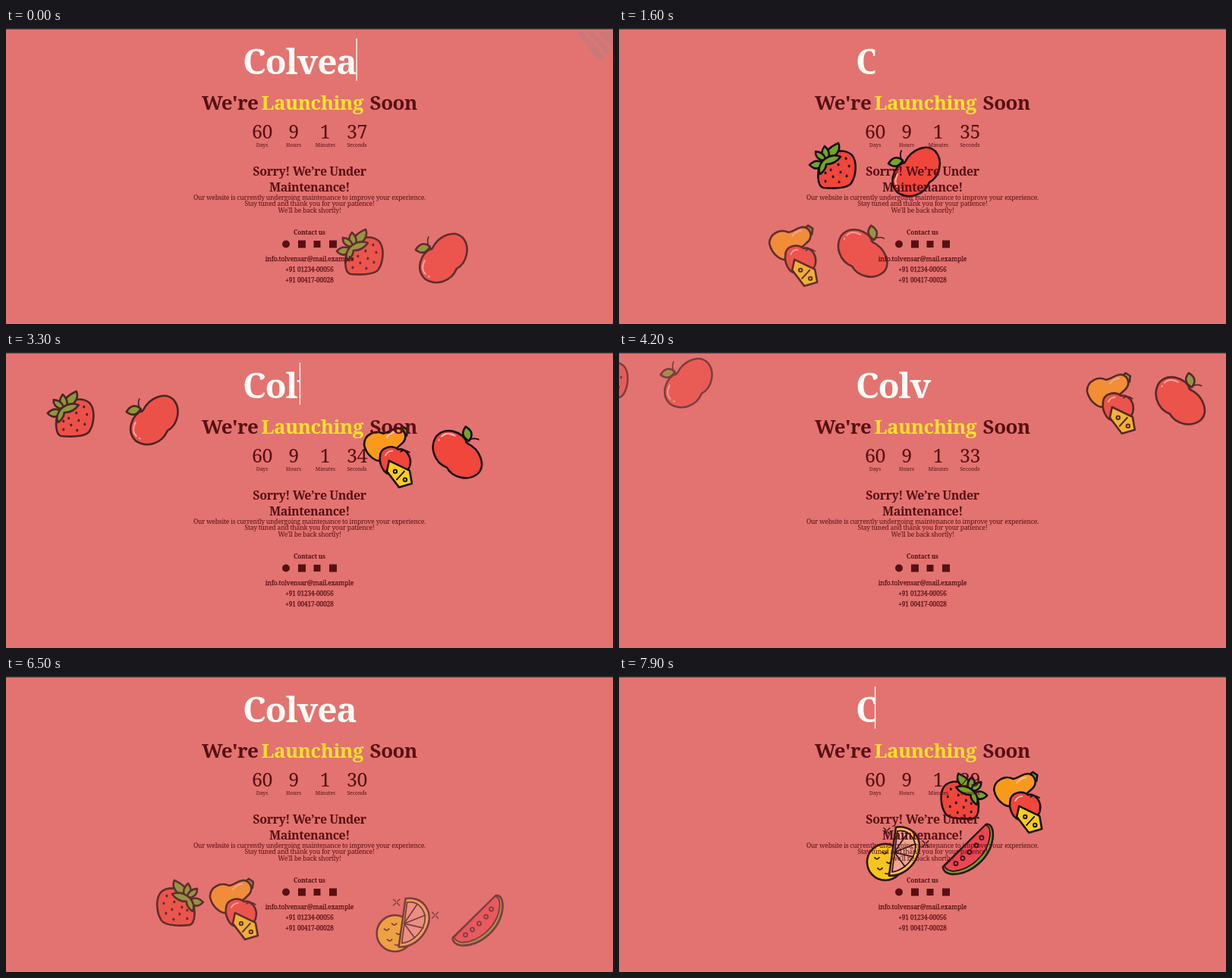
An HTML page that plays this animation: 800 px wide and 391 px high, repeating every 8000 ms.

```html
<!DOCTYPE html>
<html lang="en">
<head>
<meta charset="utf-8">
<title>Launching soon</title>
<style>
html, body { margin: 0; width: 100%; height: 100%; overflow: hidden; background: #e37370; }
svg { display: block; width: 800px; height: 391px; }
text { font-family: "Noto Serif", serif; fill: #571015; }
.mid { text-anchor: middle; }
.brand { font-size: 46px; font-weight: 700; letter-spacing: -1.2px; fill: #fffdf8; }
.title text { font-size: 26px; font-weight: 700; letter-spacing: -.55px; }
.title .hot { fill: #ffe02e; }
.digits text { font-size: 25px; letter-spacing: -.5px; }
.labels text { font-size: 6.8px; }
.sorry text { font-size: 16px; font-weight: 700; letter-spacing: -.45px; }
.body text { font-size: 8.5px; letter-spacing: -.18px; }
.contact { font-size: 8.2px; font-weight: 700; letter-spacing: -.15px; }
.mail, .phone { stroke: #571015; stroke-width: .25px; }
.mail { font-size: 8.5px; letter-spacing: -.1px; }
.phone { font-size: 8.1px; }
.fruit { stroke: #190a0c; stroke-width: 2.6; stroke-linejoin: round; stroke-linecap: round; }
.red { fill: #f0463c; } .green { fill: #6fa52b; } .orange { fill: #f99a1c; } .yellow { fill: #f8cf18; }
.line { fill: none; } .thin { stroke-width: 1.7; } .dots { stroke-width: 3; }
.shine { fill: none; stroke: #fbb9b0; stroke-width: 2; }
</style>
</head>
<body>
<svg viewBox="0 0 800 391">
  <defs>
    <clipPath id="typed"><rect id="reveal" x="311" y="10" height="65"/></clipPath>
    <g id="strawberry" class="fruit">
      <path class="red" d="M-14-8C-6-18 14-24 25-15C34-6 31 14 25 23C20 31-3 30-12 29C-20 27-21 8-14-8Z"/>
      <g class="green">
        <path d="M-10-10Q-10-22 8-30Q13-19-2-9Z"/>
        <path d="M-11-9Q-17-17-10-26Q-2-19-5-10Z"/>
        <path d="M-13-7Q-23-10-22-19Q-11-18-9-9Z"/>
        <path d="M-12-4Q-22-10-30-1Q-21 8-13 0Z"/>
        <path d="M-13-6Q-20 3-16 11Q-8 5-8-2Q4-2 11-12Q-2-17-13-6Z"/>
      </g>
      <path class="line dots" d="M-2 5v.8M8-2v.8M18-10v.8M22 0v.8M11 8v.8M1 14v.8M-9 20v.8M19 13v.8M9 21v.8M-9 9v.8"/>
    </g>
    <g id="apple" class="fruit">
      <path class="red" d="M-13-12C-5-29 16-37 27-26C38-13 32 8 19 15C12 32-8 38-22 29C-36 17-29-6-13-12Z"/>
      <path class="line thin" d="M-14-10Q-22-18-18-27"/>
      <path class="green" d="M-16-14Q-27-23-35-10Q-24-1-16-14Z"/>
      <path class="shine" d="M-23 4Q-29 15-22 22"/>
      <path class="shine" d="M-18 25l1 .5"/>
    </g>
    <g id="squash" class="fruit">
      <path class="green" d="M15-36L20-40L26-36L25-28L19-28Z"/>
      <path class="orange" d="M-31-16C-31-30-16-36-6-31C2-32 6-38 14-38C24-36 27-24 18-17C10-10 4-4-4 3C-14 10-28-2-31-16Z"/>
      <path class="shine" d="M-1-26Q5-33 11-33"/>
      <path class="red" d="M-10 0C-10-14 6-16 14-10C24-12 33 0 29 13C23 28 2 27-5 18C-9 12-11 6-10 0Z"/>
      <path class="line thin" d="M17-7Q22-11 29-6"/>
      <path class="shine" d="M-3-2Q0-8 6-8"/>
      <path class="yellow" d="M2 5L29 18L32 35L15 40L-1 19Z"/>
      <g class="line" style="stroke-width:2">
        <path d="M12 30L22 19"/>
        <circle cx="10" cy="19" r="2.2"/><circle cx="23" cy="30" r="2.2"/>
      </g>
    </g>
    <g id="citrus" class="fruit">
      <circle class="yellow" cx="-11" cy="11" r="24"/>
      <path class="line thin" d="M-25 5q3 4 6 0M-15-2q3 4 6 0M-21 19q3 4 6 0M-11 26q4 2 6-2M-9 11q3 3 5 0"/>
      <path fill="#f8c94d" d="M3-35C25-39 41-18 31 4C24 20 9 30-6 29Z"/>
      <path class="thin" fill="#f3ab96" d="M5-30C22-33 34-15 26 3C19 16 8 23-2 24Z"/>
      <path class="line thin" d="M1-2L18-27M1-2L29-13M1-2L26 4M1-2L15 17"/>
      <path class="line" style="stroke-width:1.4" d="M-13-34l3 3M-5-34l-3 3M-13-26l3-3M-5-26l-3-3M38-17l3 3M46-17l-3 3M38-9l3-3M46-9l-3-3"/>
    </g>
    <g id="melon" class="fruit">
      <path class="green" d="M24-33Q33-34 33-18C31 11 4 34-22 33Q-33 31-33 23Z"/>
      <path class="thin" fill="#ee4152" d="M23-32Q30-30 29-18C26 8 2 28-20 29Q-29 28-31 22Z"/>
      <g class="line thin">
        <circle cx="-16" cy="19" r="2.6"/><circle cx="-7" cy="12" r="2.6"/><circle cx="2" cy="4" r="2.6"/>
        <circle cx="11" cy="-5" r="2.6"/><circle cx="18" cy="-15" r="2.6"/>
      </g>
    </g>
    <g id="strip">
      <path fill="#a98288" d="M-7-18L20 20L26 20L48-4L48-18Z"/>
      <path fill="none" stroke="#cf7b7c" stroke-width="4" d="M4-18L32 14M18-18L40 6"/>
    </g>
  </defs>

  <rect width="800" height="391" fill="#e37370"/>
  <g id="stage"></g>
  <rect width="800" height="1.700" fill="#2c282e"/>

  <text class="brand" x="312" y="60.500" clip-path="url(#typed)">Colvea</text>
  <rect id="caret" y="14" width="1.400" height="55.500" fill="#fffdf8"/>

  <g class="title">
    <text x="258" y="108">We're</text>
    <text class="hot" x="336.500" y="108">Launching</text>
    <text x="479.500" y="108">Soon</text>
  </g>
  <g class="digits mid">
    <text x="337.500" y="146">60</text><text x="379" y="146">9</text>
    <text x="420.500" y="146">1</text><text id="seconds" x="462.500" y="146">37</text>
  </g>
  <g class="labels mid">
    <text x="337.500" y="156.500">Days</text><text x="379" y="156.500">Hours</text>
    <text x="421" y="156.500">Minutes</text><text x="462.500" y="156.500">Seconds</text>
  </g>
  <g class="sorry mid">
    <text x="400" y="194.500">Sorry! We’re Under</text>
    <text x="400" y="215.500">Maintenance!</text>
  </g>
  <g class="body mid">
    <text x="400" y="227">Our website is currently undergoing maintenance to improve your experience.</text>
    <text x="400" y="235.300">Stay tuned and thank you for your patience!</text>
    <text x="400" y="243.500">We'll be back shortly!</text>
  </g>
  <text class="contact mid" x="400" y="273">Contact us</text>
  <g fill="#571015">
    <circle cx="369" cy="285.500" r="5"/><rect x="385" y="280.500" width="10" height="10"/>
    <rect x="405.500" y="281" width="9" height="9"/><rect x="426" y="280.500" width="10" height="10"/>
  </g>
  <text class="mail mid" x="400" y="307.500">info.tolvensar@mail.example</text>
  <text class="phone mid" x="400" y="321.500">+91 01234-00056</text>
  <text class="phone mid" x="400" y="335.500">+91 00417-00028</text>
</svg>
<script>
const $ = id => document.getElementById(id);

// Two flight paths: x runs at constant speed, y and opacity follow [seconds, value] keys.
const toLeft = {
  x: s => 466 - 115.500 * s,
  y: [[-2, 415], [-1.2, 368], [0, 296], [1.6, 182], [3.3, 82], [4.2, 33], [5.4, -25]],
  fade: [[-1.75, 0], [-1.2, .3], [0, .65], [.9, .9], [1.6, 1], [2.5, 1], [3.3, .75], [4.2, .5], [5.3, 0]]
};
const toRight = {
  x: s => 118 + 161 * s,
  y: [[-.5, 415], [0, 367], [.7, 300], [1.3, 240], [2.1, 159], [2.4, 138], [3.3, 67], [4.3, 5]],
  fade: [[-.45, 0], [0, .3], [.7, .65], [1.3, .85], [1.8, 1], [2.4, 1], [3.3, .7], [4.4, .2], [4.6, 0]]
};

// [shape, path, start in seconds, dx, dy, own transform]
const flights = [
  ["strip", toRight, -3.98, 0, 0, "translate(0 -2)"],
  ["strawberry", toLeft, 0, 0, 0, ""],
  ["apple", toLeft, 0, 109, 7, ""],
  ["squash", toRight, .91, 0, 0, ""],
  ["apple", toRight, .91, 93, -5, "rotate(90)"],
  ["strawberry", toRight, 5.8, -1, 0, "scale(-1 1)"],
  ["squash", toRight, 5.8, 69, 8, ""],
  ["citrus", toLeft, 7, 0, 3, ""],
  ["melon", toLeft, 7, 98, -3, ""]
].map(([shape, path, start, dx, dy, own]) => {
  const node = document.createElementNS("http://www.w3.org/2000/svg", "use");
  node.setAttribute("href", "#" + shape);
  $("stage").append(node);
  return { node, path, start, dx, dy, own };
});

function at(keys, s) {
  if (s <= keys[0][0]) return keys[0][1];
  for (let i = 1; i < keys.length; i++) {
    const [a, from] = keys[i - 1], [b, to] = keys[i];
    if (s <= b) return from + (to - from) * (s - a) / (b - a);
  }
  return keys[keys.length - 1][1];
}

function draw() {
  const t = performance.now() % 8000 / 1000;
  for (const { node, path, start, dx, dy, own } of flights) {
    const s = t - start;
    node.setAttribute("transform", `translate(${path.x(s) + dx} ${at(path.y, s) + dy}) ${own}`);
    node.setAttribute("opacity", at(path.fade, s));
  }
  const letters = Math.min(6, Math.floor((t + 5.4) % 6 * 1.2));
  $("reveal").setAttribute("width", 1.500 + 24.900 * letters);
  $("caret").setAttribute("x", 312 + 24.900 * letters);
  $("caret").setAttribute("opacity", (t + .55) % 1.2 < .6 ? 1 : 0);
  $("seconds").textContent = 37 - Math.floor(t + .55);
  requestAnimationFrame(draw);
}
draw();
</script>
</body>
</html>
```
